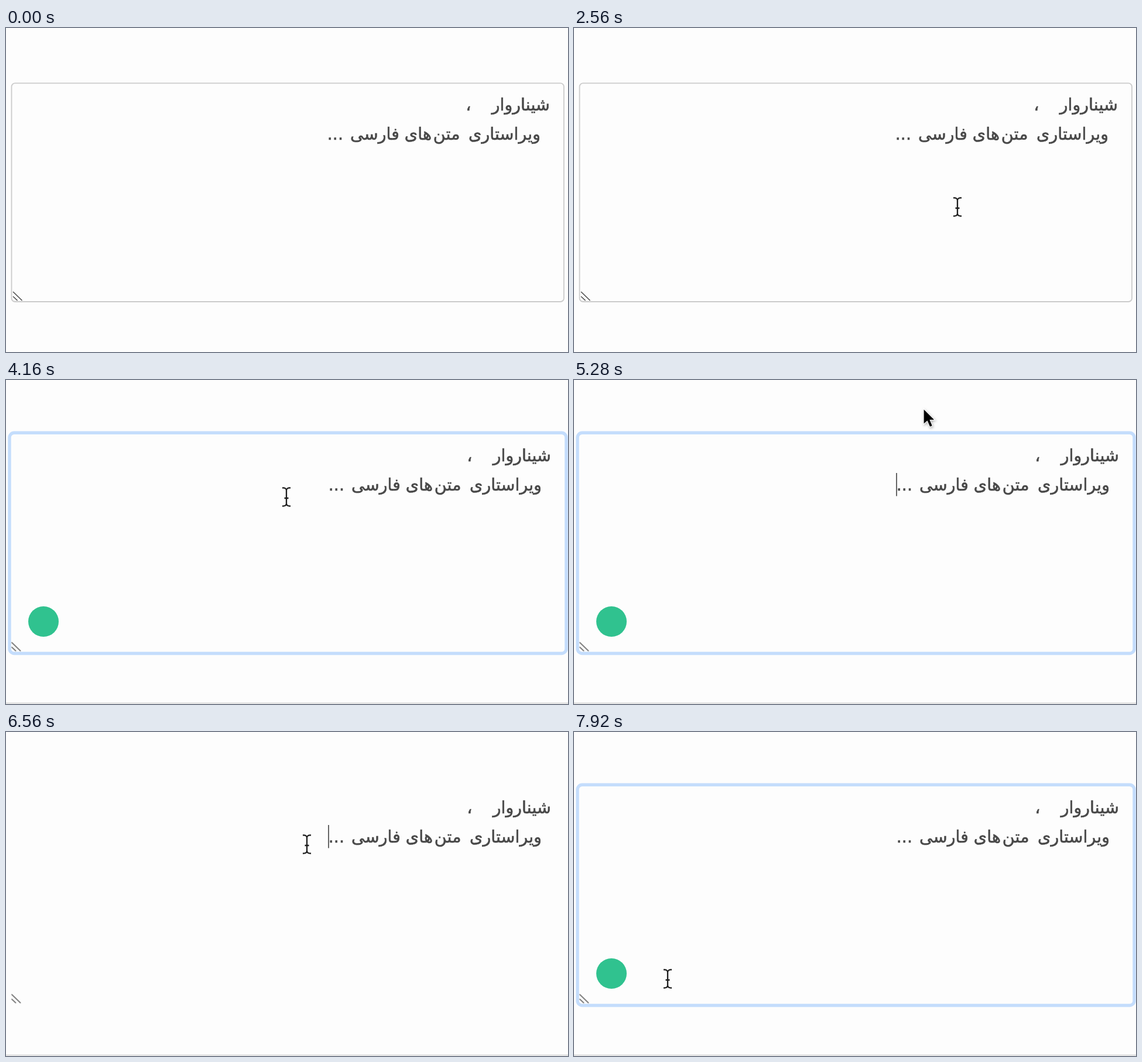
These frames come from a looping animation (960x554 px, 8 s). An HTML page:

```html
<!DOCTYPE html>
<html lang="fa">
<head>
<meta charset="utf-8">
<title>Text field</title>
<style>
  html, body { margin: 0; width: 100%; height: 100%; overflow: hidden; background: #fdfdfd; }
  svg { display: block; width: 100%; height: 100%; }

  /* One loop is 8 s, so 1% of the timeline is 80 ms. */
  .text, .grip, .border, .focused, .ring, .caret, .badge, .cursor, .arrow, .beam {
    animation: 8s linear infinite;
  }
  .text, .grip, .focused, .caret, .arrow, .beam { animation-timing-function: step-end; }

  text {
    font: 28.6px "DejaVu Sans", sans-serif;
    fill: #484848; stroke: #484848; stroke-width: .6;
    direction: rtl; text-anchor: start;
  }

  .text { animation-name: text; }
  @keyframes text {
    0%, 68% { transform: none; }
    43%, 82%, 100% { transform: translate(2px, -2px); }
  }

  .grip { animation-name: grip; fill: none; stroke: #484848; stroke-width: 1.5; }
  @keyframes grip {
    0%, 68% { transform: none; }
    43%, 82%, 100% { transform: translate(-2.5px, -2.5px); }
  }

  .border { animation-name: border; fill: none; stroke-width: 1.8; }
  @keyframes border {
    0%, 42.99% { stroke: #cbcbcb; opacity: 1; }
    43%, 67.99% { stroke: #a6c6f4; opacity: 0; }
    68%, 71% { stroke: #aebfdc; opacity: 1; }
    72.5%, 81.99% { stroke: #cbcbcb; opacity: 1; }
    82%, 100% { stroke: #cbcbcb; opacity: 0; }
  }

  .ring { animation-name: ring; fill: none; stroke: #c4ddfc; stroke-width: 5.4; }
  @keyframes ring {
    0%, 43% { opacity: 0; }
    47%, 68% { opacity: 1; }
    72%, 82% { opacity: 0; }
    87%, 100% { opacity: 1; }
  }

  .focused { animation-name: focused; }
  @keyframes focused {
    0%, 68% { opacity: 0; }
    43%, 82%, 100% { opacity: 1; }
  }

  .caret { animation-name: caret; }
  @keyframes caret {
    0%, 52%, 68%, 90%, 100% { opacity: 0; }
    43%, 58%, 82% { opacity: 1; }
  }

  .badge { animation-name: badge; transform-origin: 64px 418px; fill: #30c28f; }
  @keyframes badge {
    0%, 43% { transform: scale(0); opacity: 0; }
    48%, 68% { transform: none; opacity: 1; }
    71% { transform: scale(.46); opacity: .18; }
    72%, 82% { transform: scale(0); opacity: 0; }
    87%, 100% { transform: none; opacity: 1; }
  }

  .cursor { animation-name: cursor; }
  @keyframes cursor {
    0% { transform: translate(712px, -40px); }
    10% { transform: translate(712px, -40px); animation-timing-function: ease-out; }
    21% { transform: translate(482px, 229px); }
    22% { transform: translate(477px, 223px); animation-timing-function: ease-in-out; }
    32%, 33% { transform: translate(655px, 306px); }
    35% { transform: translate(679px, 258px); }
    38% { transform: translate(679px, 258px); animation-timing-function: ease-in-out; }
    42% { transform: translate(479px, 200px); }
    62% { transform: translate(479px, 200px); animation-timing-function: ease-in-out; }
    66% { transform: translate(597px, 49px); }
    71% { transform: translate(614px, 20px); }
    72% { transform: translate(614px, 33px); }
    73% { transform: translate(614px, 33px); animation-timing-function: ease-in-out; }
    81% { transform: translate(514px, 192px); }
    90% { transform: translate(514px, 192px); animation-timing-function: ease-in-out; }
    99%, 100% { transform: translate(160px, 422px); }
  }

  .arrow { animation-name: arrow; filter: drop-shadow(1px 2px 2px rgba(0, 0, 0, .3)); }
  @keyframes arrow {
    0%, 64.4% { opacity: 1; }
    13.6%, 76.5%, 100% { opacity: 0; }
  }

  .beam { animation-name: beam; fill: none; stroke: #1c1c1c; stroke-width: 2.3; }
  @keyframes beam {
    0%, 64.4% { opacity: 0; }
    13.6%, 76.5%, 100% { opacity: 1; }
  }
</style>
</head>
<body>
<svg viewBox="0 0 960 554" preserveAspectRatio="none">
  <rect class="border" x="9.5" y="94.3" width="943.5" height="373.7" rx="6"/>
  <rect class="ring" x="6" y="90.3" width="951" height="377.2" rx="8"/>
  <path class="focused" d="M0 552.5H960" stroke="#dcdcdc" stroke-width="2"/>

  <g class="text">
    <text x="929" y="141">شیناروار</text>
    <text x="794.5" y="141">،</text>
    <text x="913" y="191">ویراستاری</text>
    <text x="775.5" y="191">متن</text>
    <text x="727" y="191">های</text>
    <text x="672" y="191">فارسی</text>
    <text x="576" y="191">...</text>
  </g>

  <path class="grip" d="M12 451l15.500 15M12 459l7.500 7"/>
  <circle class="badge" cx="64" cy="413" r="26"/>
  <path class="caret" d="M551 159V198.500" stroke="#333" stroke-width="1.5"/>

  <g class="cursor">
    <path class="arrow" d="M0 0V27L6.300 21.500L10.700 31.500L15.500 29.500L11.300 19.500H19.500Z"
          fill="#000" stroke="#fff" stroke-width="1.2"/>
    <path class="beam" d="M-7 -15.500Q0 -16 0 -11Q0 -16 7 -15.500M0 -12V12M-7 15.500Q0 16 0 11Q0 16 7 15.500M-3.500 2H3.500"/>
  </g>
</svg>
</body>
</html>
```
